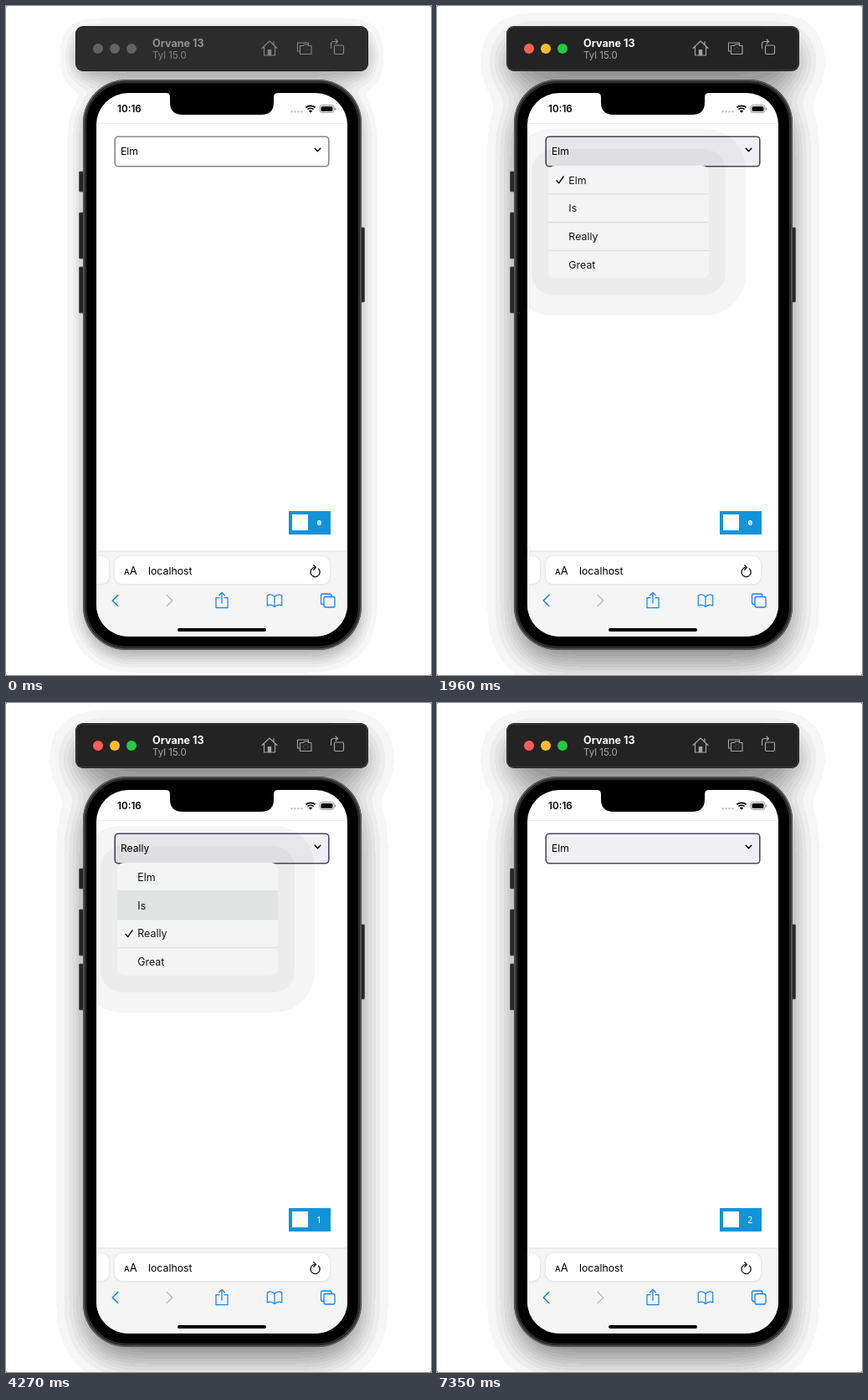
Animation, 508 px wide and 800 px high, one loop 7.42 s. Source, as an HTML page with a canvas:

```html
<!DOCTYPE html>
<html lang="en">
<head>
<meta charset="utf-8">
<title>Select menu on a phone</title>
<style>
html, body { margin: 0; width: 100%; height: 100%; overflow: hidden; background: #fff; }
canvas { display: block; width: 508px; height: 800px; }
</style>
</head>
<body>
<canvas id="stage"></canvas>
<script>
const W = 508, H = 800, LOOP = 7420, STEP = 70;
const SANS = 'Inter, "Liberation Sans", sans-serif';
const MONO = '"Noto Sans Mono", "DejaVu Sans Mono", monospace';
const OPTIONS = ['Elm', 'Is', 'Really', 'Great'];
const BLUE = '#1a82ef';

const canvas = document.getElementById('stage');
const ratio = window.devicePixelRatio || 1;
canvas.width = W * ratio;
canvas.height = H * ratio;
const g = canvas.getContext('2d');
g.scale(ratio, ratio);

// Each session: menu opens, a row is pressed, menu closes with a new choice.
const sessions = [
  { open: 1640, close: 2560, checked: 0, picked: 2, press: [[2170, 2]] },
  { open: 3390, close: 5360, checked: 2, picked: 0, press: [[4200, 1], [4970, 0]] }
];

function box(x, y, w, h, r, fill, stroke, line = 1) {
  g.beginPath();
  g.roundRect(x, y, w, h, r);
  if (fill) { g.fillStyle = fill; g.fill(); }
  if (stroke) { g.strokeStyle = stroke; g.lineWidth = line; g.stroke(); }
}

function disc(x, y, r, fill) {
  g.beginPath();
  g.arc(x, y, r, 0, Math.PI * 2);
  g.fillStyle = fill;
  g.fill();
}

function path(d, color, line = 1.2, x = 0, y = 0) {
  g.save();
  g.translate(x, y);
  g.strokeStyle = color;
  g.lineWidth = line;
  g.lineCap = g.lineJoin = 'round';
  g.stroke(new Path2D(d));
  g.restore();
}

function text(str, x, y, size, color, weight = 400, family = SANS, align = 'left') {
  g.font = `${weight} ${size}px ${family}`;
  g.textAlign = align;
  g.textBaseline = 'alphabetic';
  g.fillStyle = color;
  g.fillText(str, x, y);
}

// Soft window shadow in flat tonal steps.
function makeShadow(blur, drop, opacity) {
  const layer = document.createElement('canvas');
  layer.width = W;
  layer.height = H;
  const c = layer.getContext('2d');
  c.shadowColor = `rgba(0,0,0,${opacity})`;
  c.shadowBlur = blur;
  c.shadowOffsetY = drop;
  c.beginPath();
  c.roundRect(84, 25, 348, 52, 9);
  c.roundRect(93, 89, 331, 680, 51);
  c.fill();
  const img = c.getImageData(0, 0, W, H), tone = 9;
  for (let i = 3; i < img.data.length; i += 4) {
    img.data[i] = Math.round(img.data[i] / tone) * tone;
  }
  c.putImageData(img, 0, 0);
  return layer;
}
const shadows = { idle: makeShadow(25, 9, 0.4), active: makeShadow(38, 16, 0.5) };

function drawTitleBar(active) {
  box(83, 24, 350, 54, 9, '#000');
  box(84, 25, 348, 52, 8, active ? '#232323' : '#2c2c2c', active ? '#484848' : '#353535');
  const lights = active ? ['#ff5f57', '#febc2e', '#28c840'] : ['#626262', '#626262', '#626262'];
  lights.forEach((c, i) => disc(110 + 20 * i, 51, 6, c));
  text('Orvane 13', 175, 49, 12.6, active ? '#fff' : '#929292', 700);
  text('Tyl 15.0', 175, 63, 11.5, active ? '#a6a6a6' : '#828282');

  const ink = active ? '#a3a3a3' : '#858585';
  path('M-9 0L0 -8.5L9 0M-6.5 -2V8.5H6.5V-2M5 -8V-4.5', ink, 1.2, 315, 50.5);
  g.fillStyle = ink;
  g.fillRect(312.8, 52, 4.4, 7);
  path('M-5 4H-8V-6H5V-4M-5 -2.5H-1L0 -4H4L5 -2.5H8.5V7.5H-5Z', ink, 1.1, 356.5, 50);
  g.beginPath();
  g.arc(358.3, 52.3, 2.8, 0, Math.PI * 2);
  g.stroke();
  box(392.5, 47, 11, 10.5, 1.5, null, ink, 1.2);
  path('M-8 1V-4Q-8 -7 -5 -7H0M-2.5 -9.5L0 -7L-2.5 -4.5', ink, 1.2, 396.5, 49.5);
}

function drawBody() {
  for (const [y, h] of [[198, 24], [247, 55], [312, 55]]) {
    box(87.5, y, 6, h, 1, '#262626', '#4c4c4c', 0.8);
  }
  box(423, 265, 5.5, 89, 1, '#262626', '#4c4c4c', 0.8);
  box(92, 88, 333, 682, 52, '#222');
  box(93, 89, 331, 680, 51, null, '#5c5c5c', 1.6);
  box(95.5, 91.5, 326, 675, 48.5, '#000', '#2e2e2e', 1.5);
  box(108, 104, 300, 650, 38, '#fff');
}

function drawStatus() {
  g.fillStyle = '#000';
  g.fill(new Path2D('M191 103V104Q196 104 196 109V115Q196 130 211 130H305Q320 130 320 115V109Q320 104 325 104V103Z'));
  text('10:16', 133, 127.3, 11.7, '#000', 600);
  for (let i = 0; i < 4; i++) disc(341.5 + 4 * i, 126.3, 1.2, '#c4c4c4');
  g.lineCap = 'butt';
  g.strokeStyle = '#000';
  g.lineWidth = 1.8;
  for (const r of [8.2, 5.2]) {
    g.beginPath();
    g.arc(364, 127.5, r, Math.PI * 1.26, Math.PI * 1.74);
    g.stroke();
  }
  g.beginPath();
  g.moveTo(364, 127.8);
  g.arc(364, 127.8, 3.2, Math.PI * 1.26, Math.PI * 1.74);
  g.fillStyle = '#000';
  g.fill();
  box(375, 118.5, 17, 9, 2.8, null, '#8c8c8c', 0.9);
  box(376.5, 120, 14, 6, 1.6, '#000');
  box(393, 121.5, 1.3, 3, 0.6, '#8c8c8c');
  g.fillStyle = '#ededed';
  g.fillRect(108, 140, 300, 1);
}

function drawField(value, focused) {
  box(130.2, 156.2, 255.6, 35.6, 4, focused ? '#f0f0f4' : '#fff', focused ? '#4b4763' : '#8a859c', 1.6);
  text(value, 137, 178.4, 12.1, '#000');
  path('M-3.3 -1.7L0 1.7L3.3 -1.7', '#000', 1.5, 372.5, 172);
}

function drawBadge(count) {
  g.fillStyle = '#1293d8';
  g.fillRect(338, 604, 50, 28);
  g.fillStyle = '#fff';
  g.fillRect(342, 608, 19, 19);
  if (count) text(count, 374.3, 621.8, 10.5, '#fff', 400, '"Noto Sans", sans-serif', 'center');
  else text(count, 374.3, 621.3, 9.5, '#fff', 600, MONO, 'center');
}

function drawBrowserBar() {
  g.fillStyle = '#f5f5f5';
  g.fillRect(108, 652, 300, 102);
  g.fillStyle = '#dedede';
  g.fillRect(108, 651.5, 300, 1);
  box(90, 657, 34.5, 36, 10, '#ebebeb');
  box(90, 658, 33, 33, 9, '#fff');
  box(128.5, 657, 260, 36, 10, '#ebebeb');
  box(130, 658, 257, 33, 9, '#fff');
  text('A', 141, 679.6, 9.4, '#000', 500);
  text('A', 147.7, 679.6, 13, '#000');
  text('localhost', 170, 679.6, 12.3, '#000');
  path('M4.2 -3A5.6 5.6 0 1 1 0 -4.6M-1.6 -7.4L1.2 -4.6L-1.6 -1.8', '#111', 1.3, 369.3, 676);

  path('M3.3 -6.5L-3.3 0L3.3 6.5', BLUE, 1.6, 130.5, 711);
  path('M-3.3 -6.5L3.3 0L-3.3 6.5', '#bdbdbd', 1.6, 195.5, 711);
  path('M-3 -3.5H-7V8.5H7V-3.5H3M0 3V-9.5M-3.4 -6.2L0 -9.6L3.4 -6.2', BLUE, 1.25, 258, 711);
  path('M0 -4.5Q-4 -9 -8.7 -6V6Q-4 3.5 0 7.5Q4 3.5 8.7 6V-6Q4 -9 0 -4.5V7.5', BLUE, 1.25, 321, 711);
  path('M-4.5 4.5H-6Q-8 4.5 -8 2.5V-6Q-8 -8 -6 -8H2.5Q4.5 -8 4.5 -6V-4.5', BLUE, 1.3, 384.5, 711);
  box(380, 706.5, 13, 12.5, 2.2, null, BLUE, 1.3);
  box(205, 744, 106, 4, 2, '#000');
}

// How far the menu is unfolded, from 0 to 1.
function unfold(s, t) {
  if (t < s.open || t >= s.close + 240) return 0;
  if (t >= s.close) return 1 - (t - s.close) / 240;
  return 1 - Math.exp(-(t - s.open) / 45);
}

function drawMenu(s, t) {
  const v = unfold(s, t);
  if (v <= 0) return;
  const scale = 0.14 + 0.86 * v;
  const w = 192 * scale, h = 135 * Math.max(0, 1.38 * v - 0.38);
  const x = 229 + 25 * (1 - v) - w / 2, y = 191;
  if (h < 1) return;

  const outer = 44 * v * v, inner = 20 * v * v;
  box(x - outer, y - outer, w + 2 * outer, h + 2 * outer, outer + 4, 'rgba(0,0,0,.04)');
  if (v > 0.7) box(x - inner, y - inner, w + 2 * inner, h + 2 * inner, inner + 6, 'rgba(0,0,0,.035)');

  g.save();
  g.beginPath();
  g.roundRect(x, y, w, h, 8 * scale);
  g.clip();
  g.fillStyle = v > 0.7 ? '#f4f4f4' : '#fafafa';
  g.fillRect(x, y, w, h);
  g.globalAlpha = v;
  g.translate(x, y);
  g.scale(scale, scale);
  const pressed = s.press.filter(([from]) => t >= from).pop();
  const row = 33.9;
  OPTIONS.forEach((name, i) => {
    const top = i * row;
    if (pressed && pressed[1] === i) {
      g.fillStyle = '#e1e2e2';
      g.fillRect(0, top, 192, row);
    }
    if (i) {
      g.fillStyle = '#dadada';
      g.fillRect(0, top - 0.5, 192, 1);
    }
    text(name, 24.3, top + 21.6, 12.4, '#111');
    if (i === s.checked) path('M-4 0.7L-1.3 3.8L4 -4', '#111', 1.5, 14, top + 17);
  });
  g.restore();
}

function draw(t) {
  const active = t >= 420;
  const done = sessions.filter(s => t >= s.close);
  const value = done.length ? OPTIONS[done[done.length - 1].picked] : 'Elm';

  g.fillStyle = '#fff';
  g.fillRect(0, 0, W, H);
  g.drawImage(active ? shadows.active : shadows.idle, 0, 0, W, H);
  g.fillStyle = '#777';
  for (const x of [0, W - 1]) for (const y of [0, H - 1]) g.fillRect(x, y, 1, 1);

  drawTitleBar(active);
  drawBody();
  g.save();
  g.beginPath();
  g.roundRect(108, 104, 300, 650, 38);
  g.clip();
  drawField(value, t >= sessions[0].open);
  sessions.forEach(s => drawMenu(s, t));
  drawBadge(done.length);
  drawBrowserBar();
  drawStatus();
  g.restore();
}

let start = null, shown = -1;
function tick(now) {
  if (start === null) start = now;
  const t = Math.floor(((now - start) % LOOP) / STEP) * STEP;
  if (t !== shown) draw(shown = t);
  requestAnimationFrame(tick);
}
draw(0);
requestAnimationFrame(tick);
</script>
</body>
</html>
```
